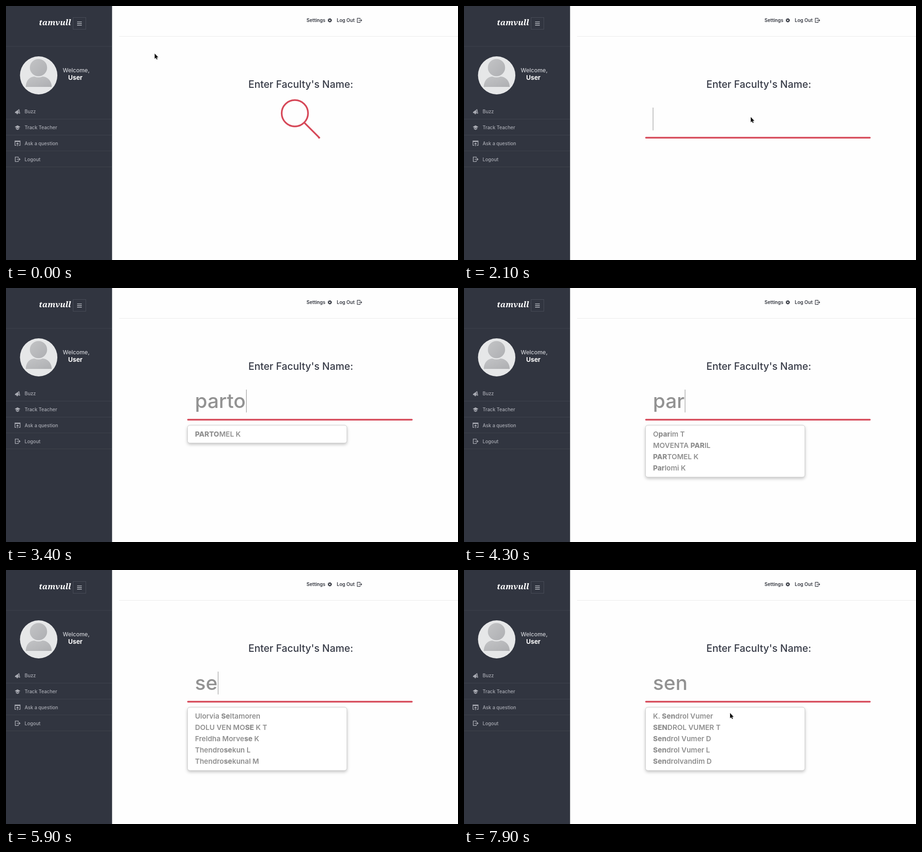
Recreate the animation shown at these times as an HTML page. Size 960 by 540 pixels, loop 8 s.

```html
<!DOCTYPE html>
<html lang="en">
<head>
<meta charset="utf-8">
<title>Faculty search</title>
<style>
  html, body { margin: 0; width: 100%; height: 100%; overflow: hidden; background: #fefefe; }
  svg { display: block; }
  text { font-family: Inter, "Open Sans", sans-serif; font-weight: 500; white-space: pre; }
  .brand { font: italic 600 17px "Noto Serif", serif; fill: #fff; }
  .menu { font-size: 10.1px; fill: #a9abb3; }
  .top text { font-size: 10px; font-weight: 600; fill: #33363f; }
  .title { font-size: 21.2px; fill: #373b47; text-anchor: middle; }
  .typed { font-size: 42.5px; fill: #929292; }
  .item { font-size: 15px; font-weight: 600; fill: #8f8f8f; }
  .item .hit { font-weight: 800; }
  .panel { fill: #fff; stroke: #cacaca; filter: drop-shadow(0 3px 3px rgba(0, 0, 0, .22)); }
  .rule { stroke: #3e424d; }
  .icon { fill: none; stroke: #a9abb3; stroke-width: 1.3; }
  .solid { fill: #a9abb3; }
</style>
</head>
<body>
<svg width="960" height="540" viewBox="0 0 960 540">
  <defs>
    <linearGradient id="grey" x1="0" y1="0" x2="1" y2="1">
      <stop offset="0" stop-color="#c3c4c6"/>
      <stop offset="1" stop-color="#aeafb2"/>
    </linearGradient>
    <g id="exit">
      <path d="M6.5 2.6V.6H.6V9.4H6.5V7.4M3.5 5H10M7.8 2.8 10 5 7.8 7.2"/>
    </g>
  </defs>

  <rect width="960" height="540" fill="#fefefe"/>
  <rect width="225.3" height="540" fill="#313540"/>
  <path d="M240 64.5H960" stroke="#ebebeb"/>
  <path class="rule" d="M0 86H225M0 240.5H225M0 274.5H225M0 308H225M0 342H225"/>

  <text class="brand" x="70" y="41">tamvull</text>
  <rect x="142.5" y="24.5" width="27" height="25" fill="none" stroke="#484c58"/>
  <path d="M151 33.6H161M151 37.2H161M151 40.8H161" stroke="#b8bbc2" stroke-width="1.4"/>

  <ellipse cx="69.4" cy="147.5" rx="39.7" ry="40.4" fill="#e6e7e8"/>
  <path d="M42 172C42 159 50 150.5 60 150H78C88 150.5 97 159 97 172Z" fill="url(#grey)"/>
  <circle cx="69" cy="131" r="19.5" fill="url(#grey)" stroke="#e6e7e8" stroke-width="2.4"/>
  <text x="120.5" y="141" font-size="12" fill="#cbcdd2">Welcome,</text>
  <text x="132" y="157" font-size="13.3" fill="#fff" style="font-weight:700">User</text>

  <path class="solid" d="M19 225.5 28 219 30 229 24.5 227.7 25.5 230H23L21.8 227.4 19.6 228Z"/>
  <path d="M26.2 221.5 27.6 227.4" stroke="#313540"/>
  <path class="solid" d="M18.5 257 24.5 253.8 30.5 257 24.5 260.2ZM20.8 259.2 24.5 261.2 28.2 259.2V261.3L24.5 263.4 20.8 261.3Z"/>
  <path class="icon" d="M22 296.3H19V287H30V296.3H27M19 288.4H30M24.5 298V291.3M22.2 293.5 24.5 291.2 26.8 293.5"/>
  <use class="icon" href="#exit" transform="translate(19 320.5) scale(1.08)"/>
  <g class="menu">
    <text x="39.5" y="228">Buzz</text>
    <text x="39.5" y="262">Track Teacher</text>
    <text x="39.5" y="295.8">Ask a question</text>
    <text x="39.5" y="329.5">Logout</text>
  </g>

  <g class="top">
    <text x="638.3" y="34">Settings</text>
    <text x="702.6" y="34">Log Out</text>
  </g>
  <circle cx="687.7" cy="30.5" r="2.5" fill="none" stroke="#33363f" stroke-width="1.9"/>
  <circle cx="687.7" cy="30.5" r="3.8" fill="none" stroke="#33363f" stroke-width="1.3" stroke-dasharray="1.7 1.285"/>
  <use href="#exit" x="745.5" y="25.5" fill="none" stroke="#33363f" stroke-width="1.2"/>

  <text class="title" x="626" y="173.5">Enter Faculty's Name:</text>
  <path id="glass" fill="none" stroke="#d64858" stroke-width="3.5" stroke-linecap="round" stroke-linejoin="round"/>
  <text id="typed" class="typed" x="401.3" y="254.5"></text>
  <path id="caret" d="M0 216V264.5" stroke="#8f8f8f"/>
  <g id="drop">
    <rect id="panel" class="panel" x="385.5" y="291.8" width="338.5" rx="5"/>
    <g id="items"></g>
  </g>
  <path id="mouse" d="M0 0V11.2L2.6 8.9 4.3 12.7 6.1 11.9 4.4 8.2H7.8Z" fill="#111" stroke="#fff" stroke-width=".9" paint-order="stroke"/>
</svg>

<script>
const LOOP = 8000, FOCUS = 1050, BLINK = 500;
const NS = 'http://www.w3.org/2000/svg';
const $ = id => document.getElementById(id);

const people = [
  'OULTHI PRENA K', 'Edrovan Lutherven Pomrik', 'IMARVI DOPAVUNER', 'Oparim T',
  'OSTRAVELKY PHOMIRA T', 'BRELDIO MEVA TURLPA K', 'DR. VREELONTH MENDIPAGO',
  'Corin Belvid Pask F', 'MOVENTA PARIL', 'PARTOMEL K', 'Parlomi K',
  'Ulorvia Seltamoren', 'DOLU VEN MOSE K T', 'Freldha Morvese K',
  'Thendrosekun L', 'Thendrosekunal M', 'K. Sendrol Vumer', 'SENDROL VUMER T',
  'Sendrol Vumer D', 'Sendrol Vumer L', 'Sendrolvandim D'
];

// time, field text, optional start of the caret blink
const keys = [
  [0, ''], [FOCUS, ''], [2400, 'p'], [2700, 'pa'], [3000, 'par'], [3200, 'part'],
  [3400, 'parto', 3300], [4000, 'part'], [4200, 'par'], [4500, 'pa'], [4700, 'p'],
  [5100, ''], [5500, 's'], [5700, 'se'], [6400, 'sen']
];

const ease = (t, from, to) => {
  const u = Math.min(1, Math.max(0, (t - from) / (to - from)));
  return u * u * (3 - 2 * u);
};
const mix = (a, b, u) => a + (b - a) * u;

// Circle, handle, then the underline, as one stroke
const ICON = 222, LINE = 476.7;
$('glass').setAttribute('d',
  'M633.3 247.8A28 28 0 0 1 593.7 208.2A28 28 0 0 1 633.3 247.8L665.5 280h-' + LINE);

function addItem(name, query, row) {
  const text = document.createElementNS(NS, 'text');
  text.setAttribute('class', 'item');
  text.setAttribute('x', 401.5);
  text.setAttribute('y', 315.7 + row * 24.15);
  for (const part of name.split(new RegExp(`(${query})`, 'i'))) {
    const span = document.createElementNS(NS, 'tspan');
    span.textContent = part;
    if (part.toLowerCase() === query) span.setAttribute('class', 'hit');
    text.append(span);
  }
  $('items').append(text);
}

let shown = null;
function setQuery(query) {
  if (query === shown) return;
  shown = query;
  $('typed').textContent = query;
  $('items').replaceChildren();
  const found = query ? people.filter(p => p.toLowerCase().includes(query)).slice(0, 5) : [];
  found.forEach((name, row) => addItem(name, query, row));
  $('drop').style.display = found.length ? '' : 'none';
  $('panel').setAttribute('height', 13.7 + found.length * 24.15);
  const width = query ? $('typed').getComputedTextLength() + 1.2 : 0;
  $('caret').setAttribute('transform', `translate(${Math.round(401 + width) + .5} 0)`);
}

function draw(t) {
  const [time, query, start = time] = keys.filter(k => k[0] <= t).pop();
  setQuery(query);
  const lit = t >= FOCUS && Math.floor((t - start) / BLINK) % 2 === 0;
  $('caret').style.display = lit ? '' : 'none';

  const q = ease(t, 1030, 1530);
  const glass = $('glass');
  glass.setAttribute('transform', `translate(${197.7 * q} 0)`);
  glass.setAttribute('stroke-dasharray', `${mix(ICON, LINE, q)} 2000`);
  glass.setAttribute('stroke-dashoffset', -ICON * q);

  const go = ease(t, 250, 1000), back = ease(t, 7250, 7800);
  const x = mix(mix(315.7, 609, go), 565, back);
  const y = mix(mix(101, 236, go), 304, back);
  $('mouse').setAttribute('transform', `translate(${x} ${y})`);
  $('mouse').style.display = t < 2400 || t >= 7300 ? '' : 'none';
}

const begin = performance.now();
function tick() {
  draw((performance.now() - begin) % LOOP);
  requestAnimationFrame(tick);
}
tick();
</script>
</body>
</html>
```
